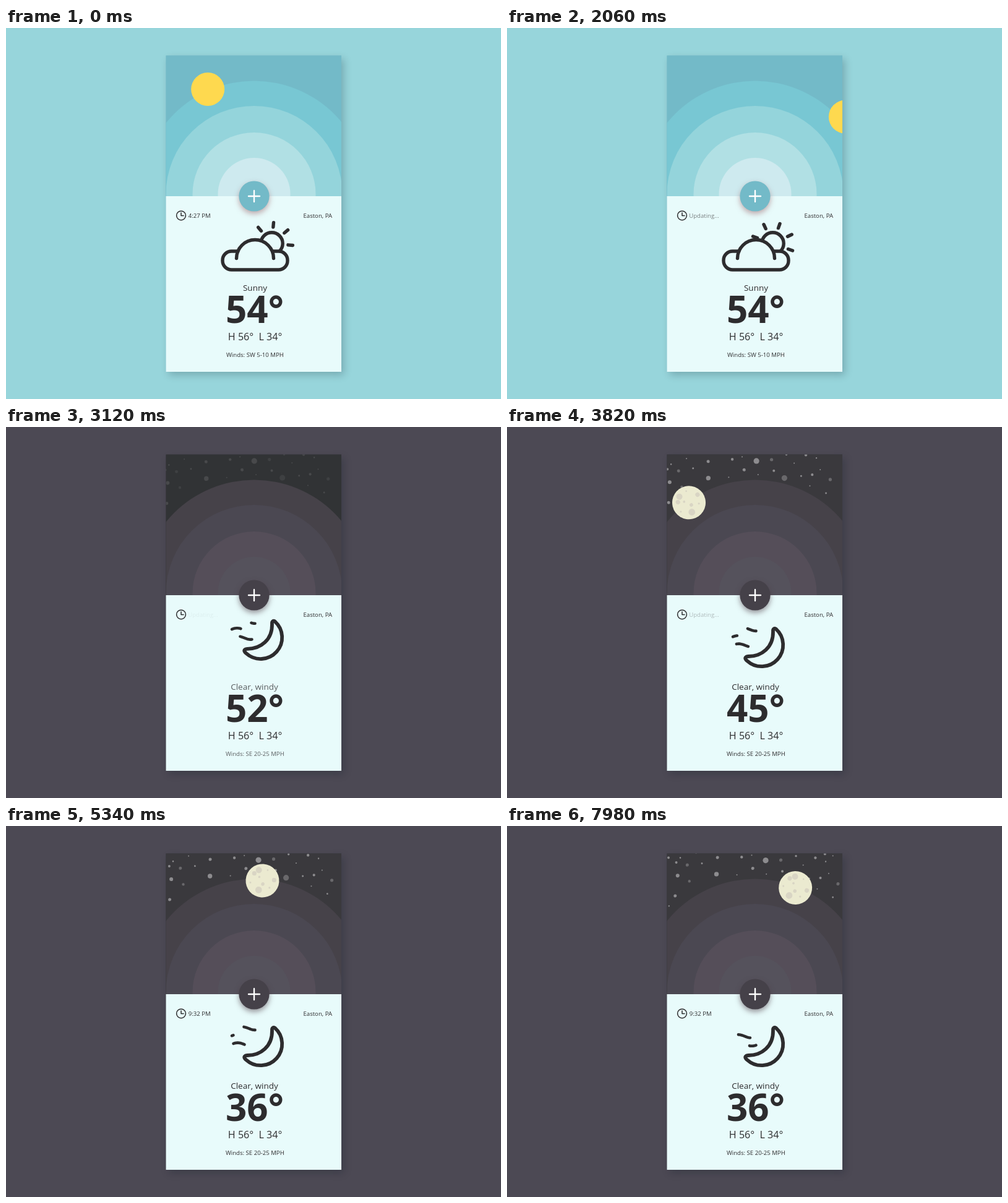
These frames come from a looping animation (800 by 600 pixels, 8 s). An HTML page with a canvas:

```html
<!DOCTYPE html>
<html lang="en">
<head>
<meta charset="utf-8">
<title>Weather card</title>
<style>
  html, body { margin: 0; width: 100%; height: 100%; overflow: hidden; background: #97d5db; }
  canvas { display: block; width: 100vw; height: 100vh; }
</style>
</head>
<body>
<canvas id="stage" width="800" height="600"></canvas>
<script>
const canvas = document.getElementById('stage');
const ctx = canvas.getContext('2d');
const LOOP = 8000;
const TAU = Math.PI * 2;
const INK = '#2d2c2e';
const PANEL = '#e8fbfb';
const CX = 401, CY = 272;
const CARD = { x: 258.5, y: 44.5, w: 283.5, h: 511.5 };

// day and night colours
const COLORS = {
  page: [[151, 213, 219], [76, 73, 84]],
  sky: [[115, 186, 200], [49, 51, 53]],
  button: [[115, 186, 200], [69, 65, 73]]
};
const RINGS = [
  { r: 183, c: [[120, 199, 211], [70, 66, 73]] },
  { r: 142.5, c: [[148, 212, 219], [75, 72, 82]] },
  { r: 99.5, c: [[177, 224, 228], [85, 78, 89]] },
  { r: 58.5, c: [[206, 234, 239], [85, 82, 92]] }
];
const NIGHT_SKY = [58, 57, 61];

// x, y, radius; negative radius marks a dim star
const STARS = [
  [261, 67, 2], [267, 59, 1.3], [264.5, 88, 3], [262.5, 121, 2.5], [279, 70, -2.5],
  [284, 96, -2.2], [292, 50, 1], [302.5, 66, 1.5], [327, 55, 2.5], [327, 82, 3.7],
  [366, 52, 2.2], [382, 48, 1], [385, 69, 2.5], [405, 55, 4.6], [429.5, 53, -2.6],
  [407.5, 77, 1], [433, 71, 2], [450, 83, -4.6], [453.5, 45, 1.7], [485, 46, 2.2],
  [502, 51, 1.2], [466, 59, 1], [477, 80, 1.5], [495, 78, 2.1], [508, 70, 1],
  [491, 96, 1], [517, 108, 1.4], [524, 86, -2.6], [360, 81, 1], [253.5, 138, 1.2],
  [248, 60, 2], [500, 39, 2], [513, 41, 1]
];
const CRATERS = [
  [-7, -16.8, 5], [-14, -11, 3.6], [18.8, -2.4, 3.6], [-5.5, -5.7, 1.9], [1, 5.3, 2.8],
  [12.2, 10.6, 1.6], [-5.1, 15.3, 5.4], [-19.2, 4.3, 1.5], [7.2, -17.7, 1.4]
];
// time, degrees from the zenith
const SUN_PATH = [[0, -20], [820, -13.5], [1420, 4.2], [1640, 19.5], [2060, 42.8], [2450, 58]];

const clamp = v => Math.max(0, Math.min(1, v));
const ramp = (t, a, b) => clamp((t - a) / (b - a));
const smooth = (t, a, b) => { const p = ramp(t, a, b); return p * p * (3 - 2 * p); };
const mix = (a, b, k) => a.map((v, i) => v + (b[i] - v) * k);
const css = c => `rgb(${c.map(Math.round).join(',')})`;
const rad = d => d * Math.PI / 180;

function spline(pts, t) {
  const last = pts.length - 1;
  if (t >= pts[last][0]) return pts[last][1];
  let i = 0;
  while (t > pts[i + 1][0]) i++;
  const slope = j => {
    const a = pts[Math.max(0, j - 1)], b = pts[Math.min(last, j + 1)];
    return (b[1] - a[1]) / (b[0] - a[0]);
  };
  const [t0, v0] = pts[i], [t1, v1] = pts[i + 1];
  const d = t1 - t0, p = (t - t0) / d, q = 1 - p;
  return v0 * (1 + 2 * p) * q * q + v1 * p * p * (3 - 2 * p)
    + d * p * q * (slope(i) * q - slope(i + 1) * p);
}

function disc(x, y, r, fill) {
  ctx.beginPath();
  ctx.arc(x, y, r, 0, TAU);
  ctx.fillStyle = fill;
  ctx.fill();
}

function line(x0, y0, x1, y1) {
  ctx.beginPath();
  ctx.moveTo(x0, y0);
  ctx.lineTo(x1, y1);
  ctx.stroke();
}

function pen(width, color = INK) {
  ctx.lineWidth = width;
  ctx.strokeStyle = color;
  ctx.lineCap = ctx.lineJoin = 'round';
}

function text(str, x, y, size, align = 'center', alpha = 1, weight = 400) {
  if (alpha <= 0) return;
  ctx.save();
  ctx.globalAlpha *= alpha;
  ctx.font = `${weight} ${size}px "Open Sans", sans-serif`;
  ctx.textAlign = align;
  ctx.fillStyle = INK;
  ctx.fillText(str, x, y);
  ctx.restore();
}

function shadowed(color, blur, dx, dy, draw) {
  ctx.save();
  ctx.shadowColor = color;
  ctx.shadowBlur = blur;
  ctx.shadowOffsetX = dx;
  ctx.shadowOffsetY = dy;
  draw();
  ctx.restore();
}

function drawStars(t) {
  const alpha = ramp(t, 2980, 3520);
  if (!alpha) return;
  const dt = (t - 4540) / 1000;
  ctx.save();
  ctx.translate(CX, CY);
  ctx.rotate(rad(dt < 0 ? dt * 0.7 : dt));
  for (const [x, y, r] of STARS) {
    ctx.globalAlpha = alpha * (r < 0 ? 0.24 : 0.42);
    disc(x - CX, y - CY, Math.abs(r), '#fff');
  }
  ctx.restore();
}

function drawMoon(t) {
  if (t < 3000) return;
  const angle = 23.5 - 34.8 * Math.exp((4540 - t) / 1360);
  ctx.save();
  ctx.translate(CX, CY);
  ctx.rotate(rad(angle));
  ctx.translate(0, -184);
  disc(0, 0, 27, '#ebead0');
  for (const [x, y, r] of CRATERS) disc(x, y, r, '#d9d5c4');
  ctx.restore();
}

function drawSun(t) {
  if (t > 2450) return;
  const a = rad(spline(SUN_PATH, t));
  disc(400 + 216 * Math.sin(a), 302 - 216 * Math.cos(a), 27, '#fed94f');
}

function drawSky(t, night) {
  const dark = mix(COLORS.sky[1], NIGHT_SKY, ramp(t, 3120, 3500));
  ctx.save();
  ctx.beginPath();
  ctx.rect(CARD.x, CARD.y, CARD.w, CY - CARD.y);
  ctx.clip();
  ctx.fillStyle = css(mix(COLORS.sky[0], dark, night));
  ctx.fillRect(CARD.x, CARD.y, CARD.w, CARD.h);
  drawStars(t);
  for (const { r, c } of RINGS) disc(CX, 268.5, r, css(mix(c[0], c[1], night)));
  drawSun(t);
  drawMoon(t);
  ctx.restore();
}

function drawDayIcon(t) {
  const out = smooth(t, 2460, 2800);
  if (out === 1) return;
  ctx.save();
  ctx.globalAlpha = 1 - out;
  ctx.translate(0, -30 * out);

  pen(5.4);
  ctx.save();
  ctx.translate(429.5, 348.5);
  ctx.rotate(rad(5 + 29 * t / 1000));
  for (let i = 0; i < 8; i++) {
    line(0, -26.5, 0, -34);
    ctx.rotate(TAU / 8);
  }
  ctx.restore();
  ctx.beginPath();
  ctx.arc(429.5, 348.5, 17.7, 0, TAU);
  ctx.stroke();

  // the cloud body hides whatever lies behind it
  ctx.fillStyle = PANEL;
  ctx.beginPath();
  ctx.arc(402.5, 372.5, 30, Math.PI, 0);
  ctx.fill();
  ctx.beginPath();
  ctx.roundRect(350, 361, 105, 30, 14.5);
  ctx.fill();
  ctx.beginPath();
  ctx.arc(402.5, 372.5, 30, Math.PI, 0);
  ctx.stroke();
  ctx.beginPath();
  ctx.moveTo(375, 361);
  ctx.lineTo(364.5, 361);
  ctx.arc(364.5, 375.5, 14.5, -Math.PI / 2, Math.PI, true);
  ctx.arc(364.5, 376.5, 14.5, Math.PI, Math.PI / 2, true);
  ctx.lineTo(440.5, 391);
  ctx.arc(440.5, 376.5, 14.5, Math.PI / 2, 0, true);
  ctx.arc(440.5, 375.5, 14.5, 0, -Math.PI / 2, true);
  ctx.lineTo(431, 361);
  ctx.stroke();
  ctx.restore();
}

// visible piece of one wavy gust, from x = tail to tail + 19
function drawGust(tail, x0, y, crest, x1) {
  const from = Math.max(tail, x0), to = Math.min(tail + 19, x1);
  if (to - from < 0.5) return;
  ctx.beginPath();
  for (let x = from; ; x = Math.min(to, x + 1)) {
    ctx.lineTo(x, y - 2.6 * Math.cos((x - crest) * Math.PI / 21));
    if (x >= to) break;
  }
  ctx.stroke();
}

function drawNightIcon(t) {
  const p = ramp(t, 2850, 3350);
  if (!p) return;
  ctx.save();
  ctx.globalAlpha = ramp(t, 2850, 3080);
  ctx.translate(0, -58 * (1 - p) ** 2);
  pen(5.8);
  ctx.beginPath();
  ctx.arc(411.5, 352.5, 34.7, rad(-48), rad(137));
  ctx.bezierCurveTo(384, 373.5, 386, 370.8, 390, 371);
  ctx.bezierCurveTo(412, 371, 430.5, 356, 430, 331);
  ctx.bezierCurveTo(429.5, 326.5, 432, 325, 434.7, 326.7);
  ctx.closePath();
  ctx.stroke();

  pen(4.6);
  const span = 70;
  const wrap = x => 345 + (((x - 345) % span) + span) % span;
  const tail = 365 + 0.0892 * (t - 4540);
  const place = shift => wrap(tail + shift);
  drawGust(place(18), 374, 327.3, 381.5, 402.5);
  drawGust(place(-18), 365, 340, 373.5, 403);
  drawGust(place(0), 367.5, 353.2, 374.5, 402.5);
  ctx.restore();
}

function drawPanel(t) {
  ctx.fillStyle = PANEL;
  ctx.fillRect(CARD.x, CY, CARD.w, CARD.y + CARD.h - CY);

  drawDayIcon(t);
  drawNightIcon(t);

  pen(1.5);
  ctx.beginPath();
  ctx.arc(283, 303.3, 7.4, 0, TAU);
  ctx.stroke();
  ctx.beginPath();
  ctx.moveTo(283, 298.8);
  ctx.lineTo(283, 303.5);
  ctx.lineTo(287, 303.5);
  ctx.stroke();

  text('4:27 PM', 294.8, 307, 9.6, 'left', 1 - smooth(t, 350, 950));
  if (t > 1440 && t < 4800) {
    const pulse = 0.5 - 0.5 * Math.cos(TAU * (t - 1440) / 840);
    text('Updating...', 294.2, 307, 9.6, 'left', clamp(0.06 + pulse));
  }
  text('9:32 PM', 294.8, 307, 9.6, 'left', smooth(t, 4850, 5250));
  text('Easton, PA', 527, 307, 9.6, 'right');

  const dayText = 1 - ramp(t, 2480, 2780);
  const nightText = ramp(t, 2780, 3230);
  text('Sunny', 402.5, 424.6, 13.5, 'center', dayText);
  text('Clear, windy', 401.5, 424.6, 13.5, 'center', nightText);
  text('Winds: SW 5-10 MPH', 402.4, 532, 9.6, 'center', dayText);
  text('Winds: SE 20-25 MPH', 402.3, 532, 9.6, 'center', nightText);

  const temp = Math.round(54 - 18 * ramp(t, 2870, 4790));
  text(temp + '°', 402, 476.8, 60, 'center', 1, 700);
  text('H 56°\u00a0 L 34°', 402.6, 504.6, 16.1);
}

function drawButton(night) {
  const glow = css(mix([150, 90, 95], [70, 50, 60], night)).replace(')', ',.5)').replace('rgb', 'rgba');
  shadowed(glow, 9, 0, 4, () =>
    disc(CX, CY, 24.6, css(mix(COLORS.button[0], COLORS.button[1], night))));
  pen(2.4, '#fff');
  line(CX - 9, CY, CX + 9, CY);
  line(CX, CY - 9, CX, CY + 9);
}

function render(t) {
  const night = smooth(t, 2430, 2990);
  ctx.fillStyle = css(mix(COLORS.page[0], COLORS.page[1], night));
  ctx.fillRect(0, 0, 800, 600);
  shadowed('rgba(0,20,30,.22)', 12, 4, 5, () => {
    ctx.fillStyle = css(mix(COLORS.sky[0], COLORS.sky[1], night));
    ctx.fillRect(CARD.x, CARD.y, CARD.w, CARD.h);
  });
  drawSky(t, night);
  drawPanel(t);
  drawButton(night);
}

const start = performance.now();
function frame() {
  render((performance.now() - start) % LOOP);
  requestAnimationFrame(frame);
}
frame();
</script>
</body>
</html>
```
